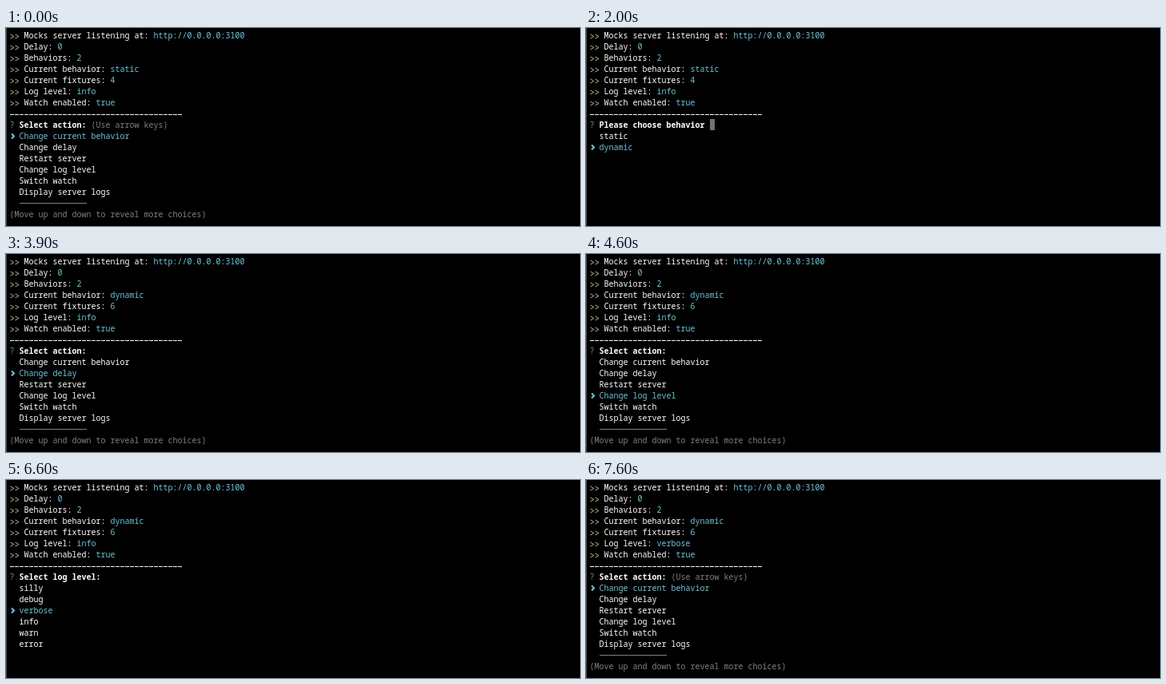
Write an HTML page with a canvas that moves like this. It is 718 px wide and 248 px high and loops after 8000 ms.

```html
<!DOCTYPE html>
<html lang="en">
<head>
<meta charset="utf-8">
<title>Terminal menu</title>
<style>
html, body { margin: 0; width: 100%; height: 100%; overflow: hidden; background: #000; }
canvas { display: block; }
</style>
</head>
<body>
<canvas id="stage" width="718" height="248"></canvas>
<script>
const ctx = document.getElementById('stage').getContext('2d');
const LOOP = 8000, LEFT = 5, COL = 6, ROW = 14;
const WHITE = '#fff', CYAN = '#6fc3da', GRAY = '#808080', GREEN = '#4fae5c', OLIVE = '#b4b48c';
const KEYS = '(Use arrow keys)';

const menu = {
  title: 'Select action:',
  hint: KEYS,
  more: true,
  items: ['Change current behavior', 'Change delay', 'Restart server',
    'Change log level', 'Switch watch', 'Display server logs']
};
const behaviors = {
  title: 'Please choose behavior',
  hint: '(Use arrow keys or type to search)',
  cursor: true,
  items: ['static', 'dynamic']
};
const levels = {
  title: 'Select log level:',
  hint: KEYS,
  items: ['silly', 'debug', 'verbose', 'info', 'warn', 'error']
};

// start time, prompt, selected item, behavior, fixtures, log level
const steps = [
  [0, menu, 0, 'static', 4, 'info'],
  [1400, behaviors, 0, 'static', 4, 'info'],
  [2000, behaviors, 1, 'static', 4, 'info'],
  [2700, menu, 0, 'dynamic', 6, 'info'],
  [3900, menu, 1, 'dynamic', 6, 'info'],
  [4300, menu, 2, 'dynamic', 6, 'info'],
  [4600, menu, 3, 'dynamic', 6, 'info'],
  [4900, levels, 0, 'dynamic', 6, 'info'],
  [5700, levels, 1, 'dynamic', 6, 'info'],
  [6300, levels, 2, 'dynamic', 6, 'info'],
  [7400, menu, 0, 'dynamic', 6, 'verbose']
];

const colX = col => LEFT + col * COL;
const baseline = row => 13 + row * ROW;

function rect(x, y, w, h, color) {
  ctx.fillStyle = color;
  ctx.fillRect(x, y, w, h);
}

// Writes a run and returns the column after it.
function write(text, col, row, color, weight = 500) {
  ctx.font = `${weight} 10px "Noto Sans Mono", "DejaVu Sans Mono", monospace`;
  ctx.fillStyle = color;
  ctx.fillText(text, colX(col) - 0.5, baseline(row));
  return col + text.length;
}

// Draws a right-pointing angle with its tip at x, y.
function angle(x, y, w, h, lineWidth, color) {
  ctx.strokeStyle = color;
  ctx.lineWidth = lineWidth;
  ctx.beginPath();
  ctx.moveTo(x - w, y - h);
  ctx.lineTo(x, y);
  ctx.lineTo(x - w, y + h);
  ctx.stroke();
}

function drawStatus(behavior, fixtures, level) {
  const lines = [
    ['Mocks server listening at:', 'http://0.0.0.0:3100'],
    ['Delay:', '0'],
    ['Behaviors:', '2'],
    ['Current behavior:', behavior],
    ['Current fixtures:', String(fixtures)],
    ['Log level:', level],
    ['Watch enabled:', 'true']
  ];
  lines.forEach(([label, value], row) => {
    for (const col of [0, 1]) angle(colX(col) + 5, baseline(row) - 2.5, 4.5, 2.5, 1, OLIVE);
    write(value, write(label, 3, row, WHITE) + 1, row, CYAN);
  });
  for (let col = 0; col < 36; col++) rect(colX(col), 108, 5, 1, WHITE);
}

function drawPrompt(prompt, selected) {
  write('?', 0, 8, GREEN);
  let col = write(prompt.title, 2, 8, WHITE, 700) + 1;
  if (selected === 0) col = write(prompt.hint, col, 8, GRAY);
  if (prompt.cursor) rect(colX(col), 114, COL, ROW, '#707070');
  prompt.items.forEach((item, i) => {
    write(item, 2, 9 + i, i === selected ? CYAN : WHITE);
  });
  angle(10, baseline(9 + selected) - 3.5, 3, 3, 2, CYAN);
  if (prompt.more) {
    rect(colX(2), 219, 14 * COL, 1, GRAY);
    write('(Move up and down to reveal more choices)', 0, 16, GRAY);
  }
}

function draw(now) {
  const time = now % LOOP;
  const [, prompt, selected, ...status] = steps.findLast(step => step[0] <= time);
  rect(0, 0, 718, 248, '#000');
  rect(0, 0, 1, 248, '#4a4a4a');
  drawStatus(...status);
  drawPrompt(prompt, selected);
}

function tick() {
  draw(performance.now());
  requestAnimationFrame(tick);
}
tick();
</script>
</body>
</html>
```
